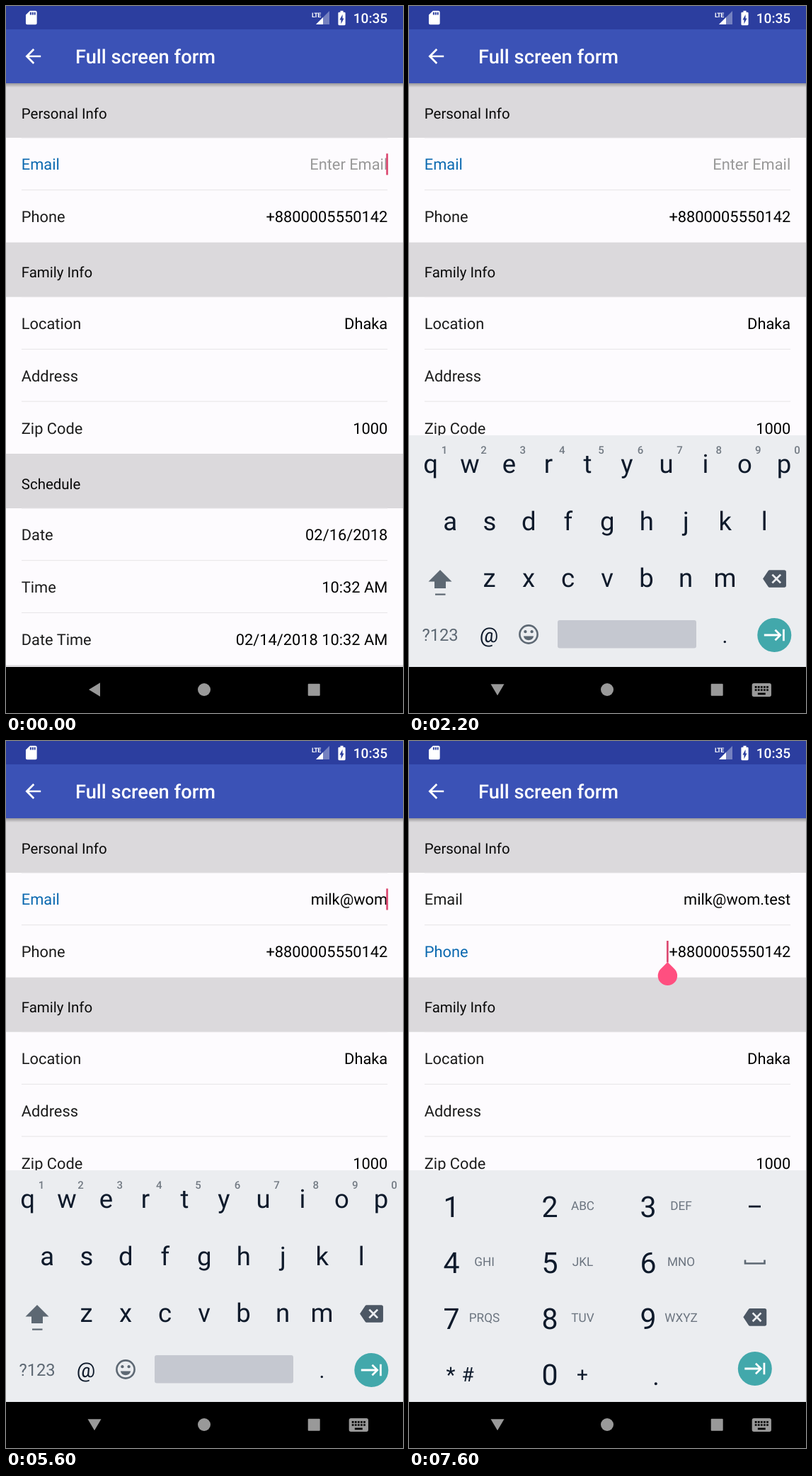
These frames come from a looping animation (561 px wide and 998 px high, 8000 ms). An HTML page:

```html
<!DOCTYPE html>
<html lang="en">
<head>
<meta charset="utf-8">
<title>Full screen form</title>
<style>
html, body { margin: 0; width: 100%; height: 100%; overflow: hidden; background: #000; }
svg { display: block; width: 561px; height: 998px; font-family: Roboto, sans-serif; text-rendering: geometricPrecision; }
</style>
</head>
<body>
<svg id="stage" viewBox="0 0 561 998"></svg>
<script>
const LOOP = 8000;
const EMAIL = 'milk@wom.test';
const KEY_TIMES = [3800, 4000, 4200, 4400, 4800, 5200, 5400, 5600, 5800, 6000, 6000, 6200, 6400];
const CURSOR_ON = [[0, 200], [800, 1200], [1600, 2200], [2600, 3200], [3800, 6800]];
const BLUE = '#0b69b0', INK = '#0e1a2b', GREY = '#5d6873';

const ICONS = {
  back: 'M20 11H7.83l5.59-5.59L12 4l-8 8 8 8 1.41-1.41L7.83 13H20z',
  card: 'M18 2h-8L4 8v12q0 2 2 2h12q2 0 2-2V4q0-2-2-2zm-6 6h-2V4h2zm3 0h-2V4h2zm3 0h-2V4h2z',
  battery: 'M15.7 4H14V2h-4v2H8.3Q7 4 7 5.3v15.4Q7 22 8.3 22h7.4q1.3 0 1.3-1.3V5.3Q17 4 15.7 4zM11 20v-5.5H9L13 7v5.5h2z',
  erase: 'M22 3H7q-1 0-1.6.9L0 12l5.4 8.1Q6 21 7 21h15q2 0 2-2V5q0-2-2-2zm-3 12.6L17.6 17 14 13.4 10.4 17 9 15.6l3.6-3.6L9 8.4 10.4 7l3.6 3.6L17.6 7 19 8.4 15.4 12z',
  next: 'M11.6 7.4 15.2 11H1v2h14.2l-3.6 3.6L13 18l6-6-6-6zM20 6v12h2V6z',
  keyboard: 'M20 5H4Q2 5 2 7v10q0 2 2 2h16q2 0 2-2V7q0-2-2-2zM5 8h2v2H5zm3 0h2v2H8zm3 0h2v2h-2zm3 0h2v2h-2zm3 0h2v2h-2zM5 11h2v2H5zm3 0h2v2H8zm3 0h2v2h-2zm3 0h2v2h-2zm3 0h2v2h-2zM8 15h8v2H8z'
};

const rect = (x, y, w, h, fill, more = '') => `<rect x="${x}" y="${y}" width="${w}" height="${h}" fill="${fill}" ${more}/>`;
const circle = (x, y, r, fill, more = '') => `<circle cx="${x}" cy="${y}" r="${r}" fill="${fill}" ${more}/>`;
const path = (d, fill, more = '') => `<path d="${d}" fill="${fill}" ${more}/>`;
const text = (s, x, y, size, fill, anchor = 'start', more = '') =>
  `<text x="${x}" y="${y}" font-size="${size}" fill="${fill}" text-anchor="${anchor}" ${more}>${s}</text>`;
const mid = (s, x, y, size, fill = INK, more) => text(s, x, y, size, fill, 'middle', more);
// Icons are drawn on a 24-unit grid, centred on (x, y).
const icon = (name, x, y, scale, fill) =>
  path(ICONS[name], fill, `fill-rule="evenodd" transform="translate(${x - 12 * scale} ${y - 12 * scale}) scale(${scale})"`);
const group = (id, body) => `<g id="${id}">${body}</g>`;
const divider = y => rect(22, y - 0.5, 517, 1, '#e6e4e7');

function section(title, top, rows) {
  const header = rect(0, top, 561, 77, '#dbd9dc') + text(title, 21.8, top + 49.6, 20.45, '#0a0a0a');
  return header + rows.map(([label, value, id], i) => {
    const y = top + 77 + i * 73.7, base = y + 45.4;
    return divider(y) +
      text(label, 21.8, base, 21.82, '#1c1c1c', 'start', id ? `id="${id}Label"` : '') +
      text(value, 539.2, base, 21.82, '#000', 'end', id ? `id="${id}Value"` : '');
  }).join('');
}

function form() {
  return rect(0, 109, 561, 824, '#fdfbfe') +
    section('Personal Info', 109, [['Email', '', 'email'], ['Phone', '+8800005550142', 'phone']]) +
    section('Family Info', 333.7, [['Location', 'Dhaka'], ['Address', ''], ['Zip Code', '1000']]) +
    section('Schedule', 632, [['Date', '02/16/2018'], ['Time', '10:32 AM'], ['Date Time', '02/14/2018 10:32 AM']]) +
    rect(0, 930.5, 561, 2, '#d8d6d9');
}

function bars() {
  return `<linearGradient id="shade" x2="0" y2="1"><stop stop-opacity=".3"/><stop offset="1" stop-opacity="0"/></linearGradient>` +
    rect(0, 109, 561, 6, 'url(#shade)') +
    rect(0, 0, 561, 33, '#2c3e9f') + rect(0, 33, 561, 76, '#3b52b6') +
    icon('card', 35.8, 16.5, 0.98, '#fff') +
    text('LTE', 432, 15.5, 9, '#fff', 'start', 'font-weight="700" letter-spacing="-.7"') +
    path('M457 7V26H438z', '#fff', 'opacity=".35"') + path('M448 16V26H438z', '#fff') +
    icon('battery', 474.5, 17, 1.02, '#fff') +
    text('10:35', 539.2, 24.2, 19.1, '#fff', 'end', 'font-weight="500"') +
    icon('back', 38.3, 71, 1.364, '#fff') +
    text('Full screen form', 98, 81.3, 27.27, '#fff', 'start', 'font-weight="500"');
}

function navigation() {
  return rect(0, 933, 561, 65, '#000') +
    path('M117 965 133 955.3V974.7z', '#999', 'id="navBack"') +
    circle(280, 965, 9, '#999') + rect(426.7, 956.7, 17, 17, '#999', 'rx="1"') +
    group('navKeyboard', path('M115.5 957.2H134.5L125 973.3z', '#999') + icon('keyboard', 498.3, 965.5, 1.364, '#999'));
}

const nextKey = (x, y) => circle(x, y, 24, '#42a8ab') + icon('next', x + 0.7, y, 1.38, '#fff');
const keyRow = (keys, x, y) => [...keys].map((k, i) => mid(k, x + i * 55.5, y, 36.5)).join('');

function letterKeys() {
  const hints = [...'1234567890'].map((k, i) => mid(k, 50 + i * 55.4, 631.5, 15, '#737b84', 'font-weight="500"')).join('');
  return keyRow('qwertyuiop', 30.5, 659) + hints + keyRow('asdfghjkl', 58.3, 739.5) + keyRow('zxcvbnm', 113.5, 820) +
    path('M44 796 60.5 812.5H52V822H36V812.5H27.5z', GREY) + rect(37, 829.5, 14.5, 2.2, GREY) +
    icon('erase', 516.5, 808.5, 1.37, '#4c5764') +
    text('?123', 18.5, 895.5, 23.7, GREY) + mid('@', 113, 898, 29.5) +
    circle(169, 887, 12.6, 'none', `stroke="${GREY}" stroke-width="2.6"`) +
    circle(164.4, 883.2, 2.1, GREY) + circle(173.6, 883.2, 2.1, GREY) + path('M161.8 889.5H176.2A7.4 7.4 0 0 1 161.8 889.5z', GREY) +
    rect(210, 867, 196, 39.5, '#c5c8d0', 'rx="3"') + mid('.', 446.5, 899, 30) + nextKey(516.3, 888);
}

function numberKeys() {
  const labels = ['', 'ABC', 'DEF', 'GHI', 'JKL', 'MNO', 'PRQS', 'TUV', 'WXYZ'];
  return labels.map((label, i) => {
    const x = 60 + i % 3 * 139, y = 657 + Math.floor(i / 3) * 79;
    return mid(i + 1, x, y + 14.5, 41) + mid(label, x + 46.5, y + 5.3, 17.2, '#6b747f');
  }).join('') +
    mid('*', 59, 905, 30) + mid('#', 83, 904, 28) + mid('0', 199, 908.5, 41) + mid('+', 245, 904, 28) + mid('.', 349, 908.5, 36) +
    rect(480, 655.7, 17, 2.8, INK) + path('M475 732.5V737.5H502.5V732.5', 'none', `stroke="${GREY}" stroke-width="2.6"`) +
    icon('erase', 488.8, 813.3, 1.37, '#4c5764') + nextKey(488.8, 886);
}

const PINK = '#dc4a72';
document.getElementById('stage').innerHTML = form() +
  rect(537.2, 208.3, 2.7, 30.2, PINK, 'id="emailCursor"') +
  rect(364, 282, 2.7, 30.5, PINK, 'id="phoneCursor"') +
  path('M365.4 312l9.7 9.7a13.7 13.7 0 1 1-19.4 0z', '#ff4f80', 'id="handle"') +
  bars() +
  rect(0, 607.5, 561, 326, '#f8f8fa', 'id="gap"') +
  group('keyboard', rect(0, 606, 561, 327, '#ebedf0') + group('letters', letterKeys()) + group('numbers', numberKeys())) +
  navigation();

const el = id => document.getElementById(id);
const show = (id, on) => { el(id).style.display = on ? '' : 'none'; };

function render() {
  const t = performance.now() % LOOP;
  const typed = EMAIL.slice(0, KEY_TIMES.filter(k => k <= t).length);
  const onPhone = t >= 7400, numeric = t >= 7600, open = t >= 2000;
  el('emailValue').textContent = typed || 'Enter Email';
  el('emailValue').setAttribute('fill', typed ? '#000' : '#999');
  el('emailLabel').setAttribute('fill', onPhone ? '#1c1c1c' : BLUE);
  el('phoneLabel').setAttribute('fill', onPhone ? BLUE : '#1c1c1c');
  show('emailCursor', CURSOR_ON.some(([from, to]) => t >= from && t < to));
  show('phoneCursor', onPhone);
  show('handle', numeric);
  show('gap', open);
  show('keyboard', t >= 2200);
  show('letters', !numeric);
  show('numbers', numeric);
  show('navBack', !open);
  show('navKeyboard', open);
  requestAnimationFrame(render);
}
render();
</script>
</body>
</html>
```
